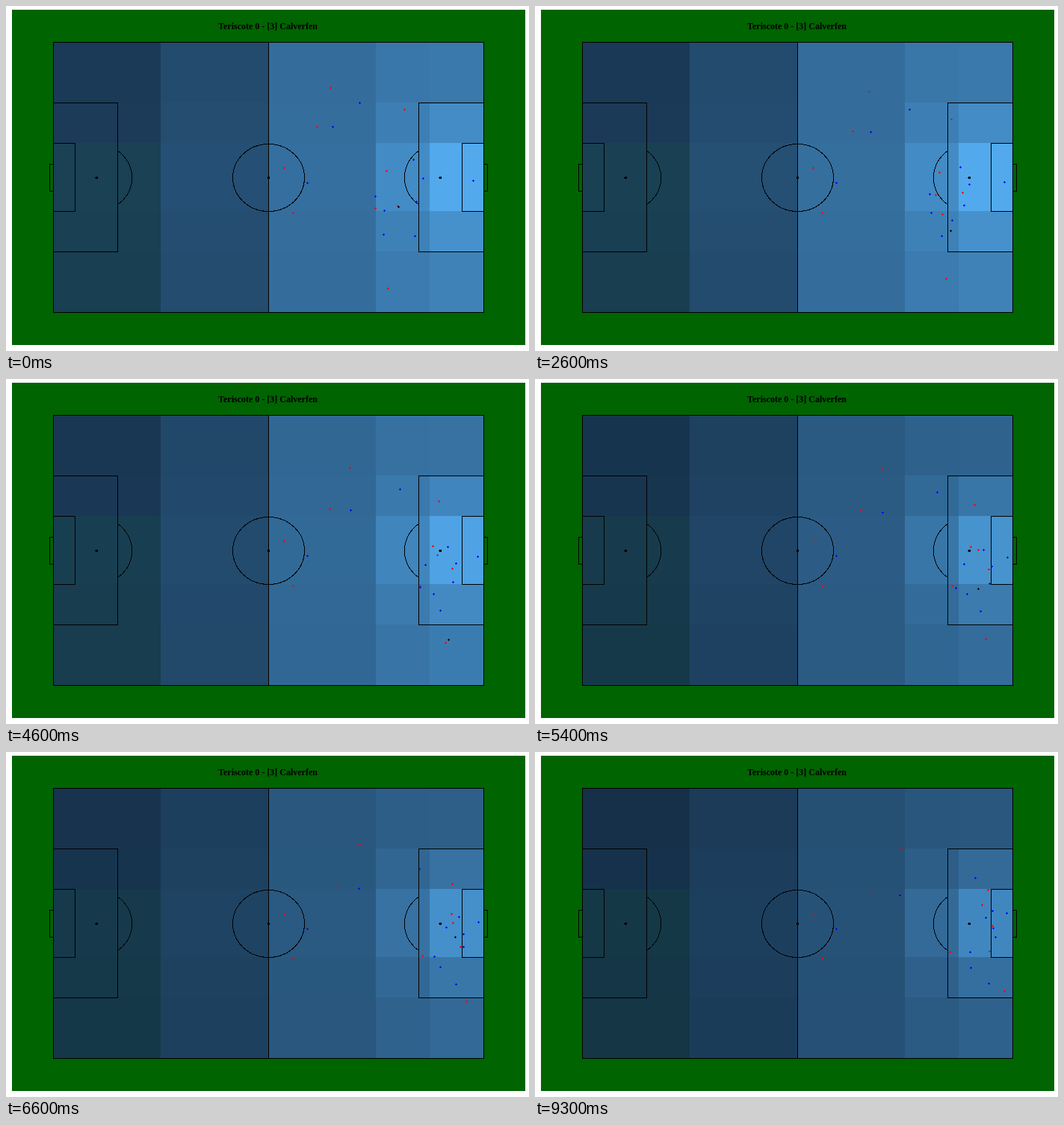
An HTML page that plays this animation: 700 by 461 pixels, repeating every 10 s.

```html
<!DOCTYPE html>
<html lang="en">
<head>
<meta charset="utf-8">
<title>Goal replay</title>
<style>
  html, body { margin: 0; width: 100%; height: 100%; overflow: hidden; background: #fff; }
  svg { display: block; width: 700px; height: 461px; }
  .lines { fill: none; stroke: #000; }
  .title { font: bold 12px "Liberation Serif", Times, serif; text-anchor: middle; }
</style>
</head>
<body>
<svg viewBox="0 0 700 461" shape-rendering="crispEdges">
  <rect x="8" y="5" width="687" height="448" fill="#006400"/>
  <text class="title" x="350.5" y="31">Teriscote 0 - [3] Calverfen</text>
  <g id="heat"></g>
  <g class="lines">
    <rect x="63.5" y="48.5" width="576" height="361"/>
    <path d="M351.5 48.5V409.5"/>
    <ellipse cx="351.5" cy="229.5" rx="48" ry="45"/>
    <path d="M63.5 129.5h86v199h-86M63.5 183.5h29v91h-29M63.5 211.5h-5v36h5M149.5 193.5A48 45 0 0 1 149.5 265.5"/>
    <path d="M639.5 129.5h-87v199h87M639.5 183.5h-29v91h29M639.5 211.5h5v36h-5M552.5 193.5A48 45 0 0 0 552.5 265.5"/>
  </g>
  <circle cx="121.5" cy="229.5" r="2"/>
  <circle cx="351.5" cy="229.5" r="1.5"/>
  <circle cx="581.5" cy="229.5" r="2"/>
  <g id="dots"></g>
</svg>
<script>
const LOOP = 10000, STEP = 100, DELAY = 5;
const TURN = 50, LAST = 88;

// A run goes from its start, past a turn, to its end, as [x, y].
// A third number sets the step at which a point is reached.
const REDS = [
  [[434, 109], [490, 129]],
  [[416, 161], [452, 186]],
  [[372, 216]],
  [[384, 276]],
  [[533, 138], [589, 169], [606, 184]],
  [[509, 220], [584, 224], [612, 232]],
  [[494, 270], [595, 227], [598, 204]],
  [[549, 261], [561, 248, 12], [608, 254], [608, 266]],
  [[511, 377], [605, 346], [628, 319]],
  [[524, 267], [541, 278, 12], [558, 276], [555, 267]]
];
const BLUES = [
  [[403, 236]],
  [[473, 129], [589, 168]],
  [[437, 161], [488, 191]],
  [[545, 205], [601, 228], [612, 212]],
  [[558, 230], [612, 250], [613, 235]],
  [[494, 254], [576, 247], [603, 221]],
  [[549, 261], [609, 273], [616, 247]],
  [[506, 273], [564, 279], [582, 267]],
  [[547, 307], [551, 286, 12], [579, 287], [583, 288]],
  [[505, 305], [598, 310], [607, 309]],
  [[625, 233], [632, 238], [631, 215]]
];
const BALL = [[525, 268], [540, 278, 12], [592, 348, 41], [593, 271], [609, 221, 73], [643, 247]];

// Zones brighten towards the goal and towards the middle rows.
const COLS = [63, 207, 351, 495, 567, 639];
const ROWS = [48, 129, 183, 274, 328, 409];
const BASE = [11, 24, 49, 57, 58];
const BOOST = [2, 3, 2, 15, 36];
const CENTRAL = [0, 0.4, 1, 0.5, 0.2];
const HEAT = [[1, 0], [1.1, 12], [0.94, 28], [0.94, 46], [0.75, 47], [0.62, LAST]];
const FADE = 3;

const lerp = (a, b, u) => a + (b - a) * u;
const easeOut = u => u * (2 - u);
const byId = id => document.getElementById(id);

function add(parent, tag, attrs) {
  const el = document.createElementNS("http://www.w3.org/2000/svg", tag);
  for (const name in attrs) el.setAttribute(name, attrs[name]);
  return parent.appendChild(el);
}

// Index of the leg that holds step k, and how far along it k is.
function leg(steps, k) {
  let i = 0;
  while (i < steps.length - 2 && k >= steps[i + 1]) i++;
  return [i, (k - steps[i]) / (steps[i + 1] - steps[i])];
}

const stepOf = ([, , step], i, path) =>
  step ?? (i === 0 ? 0 : i === path.length - 1 ? LAST : TURN);

// Runs are steady, but after a turn the last leg slows to a stop.
function place(path, k) {
  if (path.length === 1) return path[0];
  const [i, u] = leg(path.map(stepOf), k);
  const slows = i > 0 && i === path.length - 2;
  const v = slows ? easeOut(u) : u;
  return [0, 1].map(axis => Math.round(lerp(path[i][axis], path[i + 1][axis], v)));
}

function heatAt(k) {
  const [i, u] = leg(HEAT.map(h => h[1]), k);
  return lerp(HEAT[i][0], HEAT[i + 1][0], u);
}

function shade(value, teal) {
  const v = value / 100;
  const rgb = [lerp(19, 86, v), lerp(43, 177, v), lerp(67, 247, v)];
  if (teal) [-2, 5, -6].forEach((d, i) => rgb[i] += d);
  return `rgb(${rgb.map(Math.round)})`;
}

const zones = [];
for (let r = 0; r < 5; r++) {
  for (let c = 0; c < 5; c++) {
    const el = add(byId("heat"), "rect", {
      x: COLS[c], y: ROWS[r],
      width: COLS[c + 1] - COLS[c], height: ROWS[r + 1] - ROWS[r]
    });
    zones.push({ el, base: BASE[c], boost: BOOST[c] * CENTRAL[r], teal: c === 0 && r > 1 });
  }
}

const dot = (path, fill) => ({
  path,
  el: add(byId("dots"), "path", { d: "M0-1h1v1h1v1h-1v1h-1v-1h-1v-1h1z", fill })
});
const dots = [
  ...REDS.map(path => dot(path, "#f00")),
  ...BLUES.map(path => dot(path, "#00f")),
  dot(BALL, "#000")
];

function draw(t) {
  const k = Math.max(0, Math.min(LAST, Math.floor(t / STEP) - DELAY));
  for (const { path, el } of dots) {
    el.setAttribute("transform", `translate(${place(path, k).slice(0, 2)})`);
  }
  const heat = heatAt(k);
  for (const { el, base, boost, teal } of zones) {
    el.setAttribute("fill", shade(base * heat + boost - FADE * k / LAST, teal));
  }
}

const begin = performance.now();
function tick() {
  draw((performance.now() - begin) % LOOP);
  requestAnimationFrame(tick);
}
tick();
</script>
</body>
</html>
```
